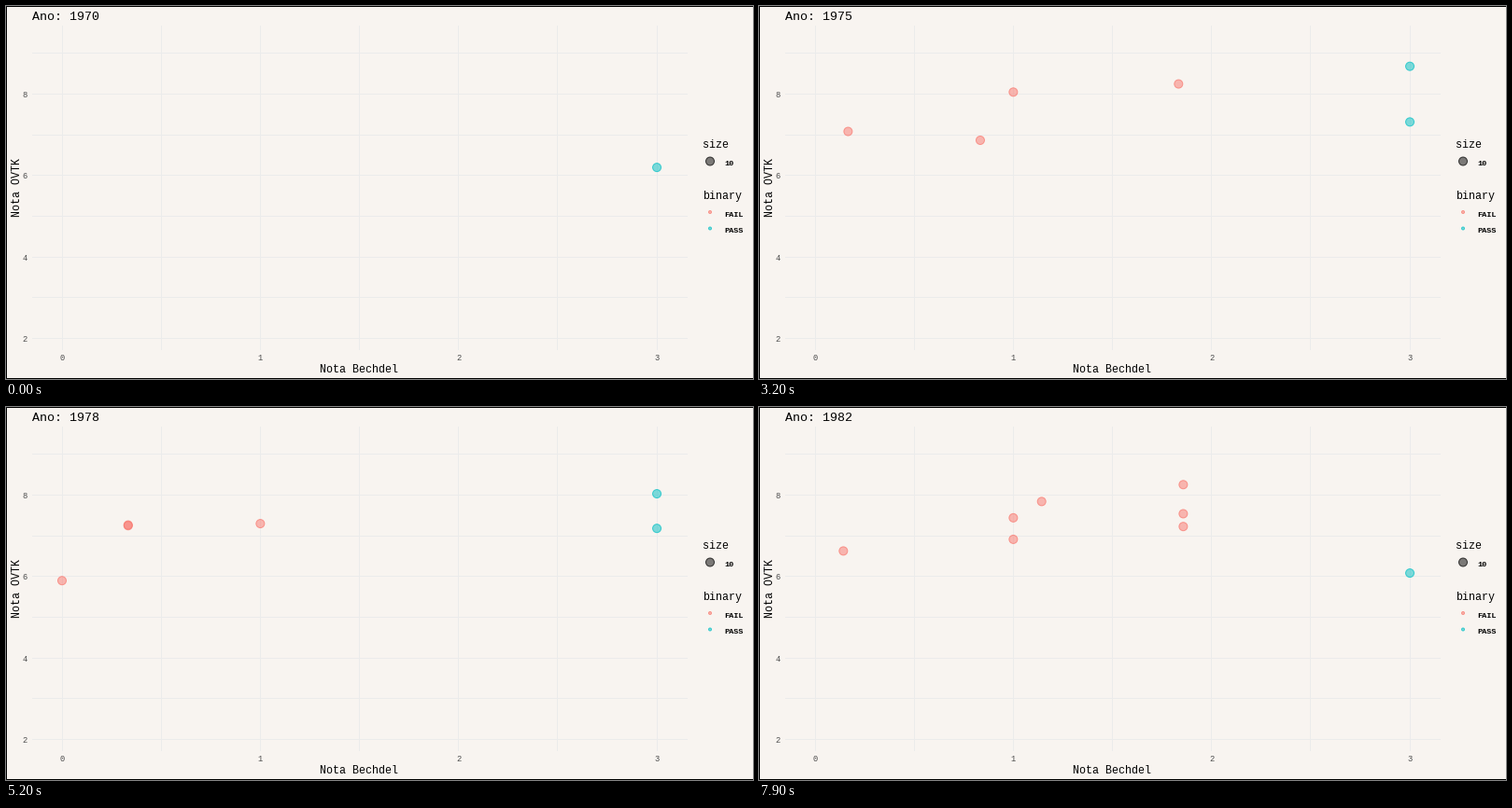
A matplotlib script for the animation above (8 s loop, 800 px wide and 400 px high).

```python
import math
import random

import matplotlib.pyplot as plt
from matplotlib.animation import FuncAnimation
from matplotlib.colors import to_rgba
from matplotlib.patches import Circle

W, H, DPI = 800, 400, 100
PX = 72 / DPI  # points per pixel
FRAMES, INTERVAL = 80, 100
FIRST_YEAR, YEARS = 1970, 13
FRAMES_PER_YEAR = 20 / 3

BG, GRID, TICK = "#F8F4F0", "#EBEBEB", "#4D4D4D"
FAIL, PASS = "#F8766D", "#00BFC4"

# Ratings of the leading film on each side, year by year
TOP_PASS = [6.2, None, 6.1, 8.1, 6.9, 7.4, 6.6, 7.2, 8.2, 6.9, 6.0, 6.0, 6.1]
TOP_FAIL = [None, 7.8, 9.2, 7.8, 7.8, 8.1, 8.1, 7.3, 7.3, 7.4, 7.5, 7.7, 7.4]
# Score and rating of the runner-up, repeating from the third year on
RUNNER_UP = [(1, 7.6), (2, 7.6), (1, 8.0), (2, 8.3), (1, 8.1), (0, 7.4), (0, 5.6)]


def failing(i):
    films = [(1, TOP_FAIL[i])] if TOP_FAIL[i] else []
    if i >= 2:
        films.append(RUNNER_UP[(i - 2) % len(RUNNER_UP)])
    lull = i == 0 or i % 7 == 2
    extras = 0 if lull else 5 if i > 10 else 2
    rng = random.Random(FIRST_YEAR + i)
    for _ in range(extras):
        films.append((rng.choice([0, 1, 1, 2]), round(rng.uniform(6.6, 8.4), 1)))
    return films


def passing(i):
    films = [(3, TOP_PASS[i])] if TOP_PASS[i] else []
    if 4 <= i <= 8:
        films.append((3, 9.1 - 0.5 * (i - 4)))
    return films


def tween(now, then, p):
    """Rows without a partner keep their place until the next year begins."""
    rows = []
    for i, (x, y) in enumerate(now):
        x2, y2 = then[i] if i < len(then) else (x, y)
        rows.append((x + (x2 - x) * p, y + (y2 - y) * p))
    return rows


def key(i):
    return round(i * FRAMES_PER_YEAR)


def films_at(frame):
    i = max(n for n in range(YEARS - 1) if key(n) <= frame)
    p = (frame - key(i)) / (key(i + 1) - key(i))
    for films, color in ((failing, FAIL), (passing, PASS)):
        for score, rating in tween(films(i), films(i + 1), p):
            yield sx(score), sy(rating), color


def sx(score):
    return 60 + 212.35 * score


def sy(rating):
    return 94.5 + 43.67 * (8 - rating)


plt.rcParams["font.family"] = "Liberation Mono"
fig = plt.figure(figsize=(W / DPI, H / DPI), dpi=DPI, facecolor=BG)
ax = fig.add_axes([0, 0, 1, 1])
ax.set_xlim(0, W)
ax.set_ylim(H, 0)
ax.axis("off")


def text(x, y, s, size, color="black", **kw):
    return ax.text(x, y, s, fontsize=size * PX, color=color, va="baseline", **kw)


def line(xs, ys, color):
    ax.plot(xs, ys, color=color, lw=PX, zorder=1)


def dot(x, y, color, radius=4.5):
    return ax.add_patch(Circle((x, y), radius, lw=PX, zorder=3,
                               fc=to_rgba(color, 0.5), ec=to_rgba(color, 0.7)))


# Grid and border, open on the right
for half in range(7):
    line([int(sx(half / 2))] * 2, [21, 368], GRID)
for rating in range(2, 10):
    line([28, 729], [int(sy(rating))] * 2, GRID)
line([W + 2, 0, 0, W + 2], [0, 0, H - 1, H - 1], "black")

# Axes
for score in range(4):
    text(sx(score), 380, str(score), 8.8, TICK, ha="center")
for rating in range(2, 10, 2):
    text(23, sy(rating) + 3.5, str(rating), 8.8, TICK, ha="right")
text(378, 393, "Nota Bechdel", 11.67, ha="center")
text(15, 194.5, "Nota OVTK", 11.67, ha="center", rotation=90,
     rotation_mode="anchor")

# Legend
text(746, 152, "size", 11.67)
dot(754, 166.5, "black")
text(769, 171, "10", 8.5, weight="bold")
text(746, 207, "binary", 11.67)
for y, label, color in ((221, "FAIL", FAIL), (238.5, "PASS", PASS)):
    dot(754, y, color, 1.5)
    text(769, y + 4.5, label, 8.5, weight="bold")

title = text(28, 15.3, "", 13.33)
shown = []


def update(frame):
    year = FIRST_YEAR + math.floor(frame / FRAMES_PER_YEAR + 0.875)
    title.set_text(f"Ano: {year}")
    while shown:
        shown.pop().remove()
    shown.extend(dot(*film) for film in films_at(frame))
    return shown


anim = FuncAnimation(fig, update, frames=FRAMES, interval=INTERVAL,
                     init_func=lambda: [], repeat=True, repeat_delay=0, blit=False)
plt.show()
```
